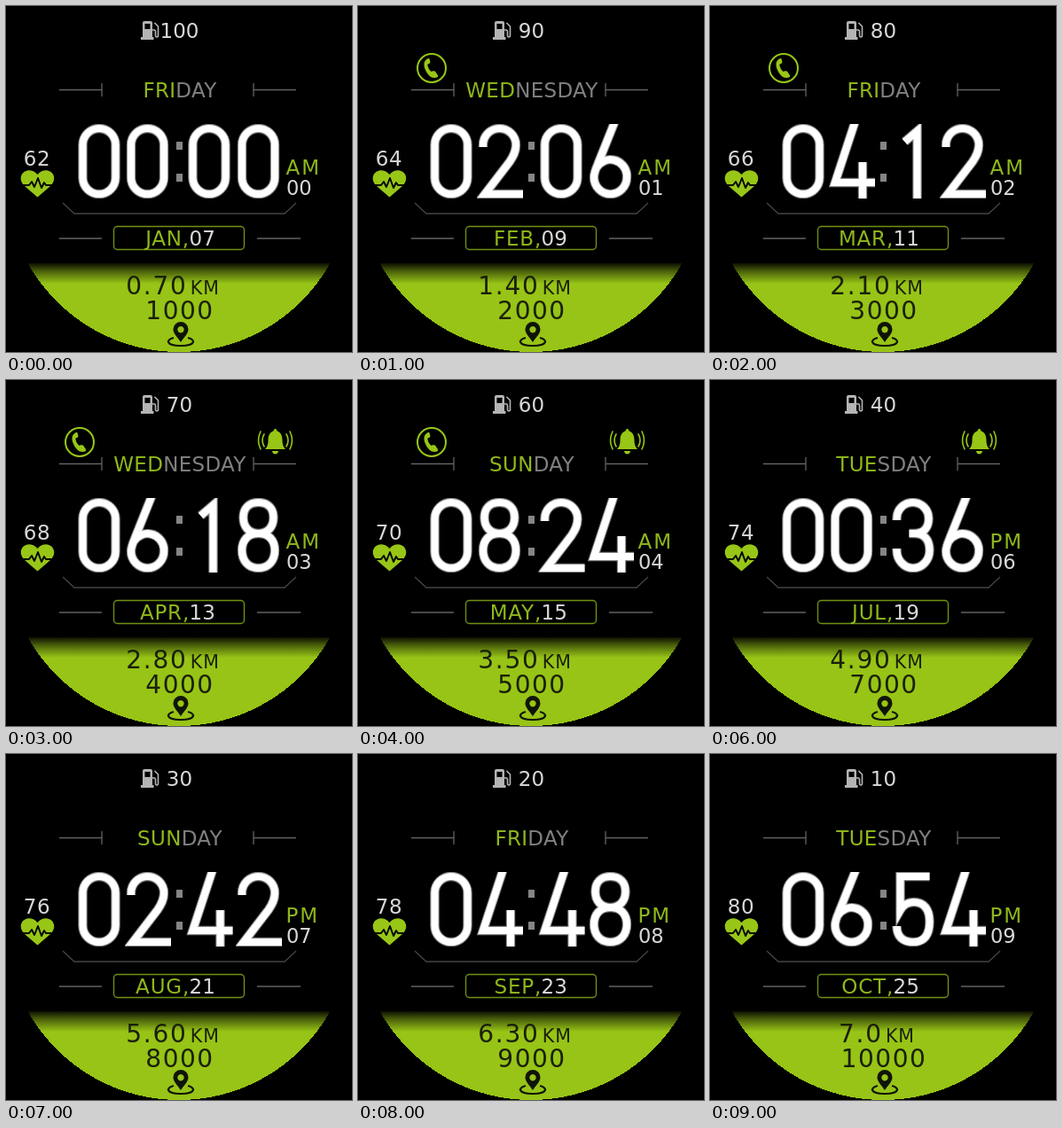
Recreate the animation shown at these times as an HTML page. Size 390 px wide and 390 px high, loop 10000 ms.

```html
<!DOCTYPE html>
<html lang="en">
<head>
<meta charset="utf-8">
<title>Watch face</title>
<style>
  html, body { margin: 0; width: 100%; height: 100%; overflow: hidden; background: #000; }
  svg { display: block; width: 100%; height: 100%; }
  text { font-family: "DejaVu Sans", sans-serif; font-size: 23px; fill: #d8d8d8; }
  .mid { text-anchor: middle; }
  .end { text-anchor: end; }
  .green { fill: #98c616; }
  text.green, tspan.green { fill: #8fb81a; }
  .gray { fill: #808080; }
  .dark { fill: #1a200a; font-size: 28px; }
  .unit { font-size: 20.5px; letter-spacing: 1px; }
  .line { fill: none; stroke: #98c616; stroke-linecap: round; stroke-linejoin: round; }
  .rule { fill: none; stroke: #626262; stroke-width: 1.3; }
  .digits path { fill: none; stroke-linejoin: miter; }
  .rim { stroke: #858585; stroke-width: 10.4; }
  .face { stroke: #fff; stroke-width: 8.2; }
</style>
</head>
<body>
<svg viewBox="0 0 390 390">
  <defs>
    <linearGradient id="shade" x2="0" y2="1">
      <stop offset="0" stop-opacity=".92"/>
      <stop offset=".4" stop-opacity=".5"/>
      <stop offset="1" stop-opacity="0"/>
    </linearGradient>
    <clipPath id="base"><rect y="290" width="390" height="100"/></clipPath>
    <clipPath id="cell"><rect x="-2" width="56" height="84"/></clipPath>
  </defs>
  <rect width="390" height="390"/>

  <g clip-path="url(#base)">
    <circle cx="195" cy="195" r="195" fill="#97c416" shape-rendering="crispEdges"/>
    <rect y="290" width="390" height="23" fill="url(#shade)"/>
  </g>

  <!-- fuel pump -->
  <g fill="#b4b4b4">
    <path fill-rule="evenodd" d="M154 19q0-2 2-2h7q2 0 2 2v16h1.500v3H152v-3h2zM156.500 20v6h6v-6z"/>
    <path d="M165 27h2q1.500 0 1.500 2v4q0 2 1.500 2t1.500-2V23l-4-4" fill="none" stroke="#b4b4b4" stroke-width="1.600"/>
  </g>
  <text id="fuel" class="mid" x="195.500" y="36"/>

  <g id="call">
    <circle class="line" cx="83" cy="70" r="16" stroke-width="2"/>
    <path class="green" transform="rotate(12 83 70)" d="M77 60c-5 3-4 9 0 14s9 8 14 5q2-1 0-3l-3-3q-1-1-3 0l-1.500 1q-4-2-6-7l2-1.500q1-1 .500-2l-1.500-3q-.500-1-1.500-.500z"/>
  </g>
  <g id="alarm">
    <path class="green" d="M303.500 55q2 0 2 2.500c5 2 6 6 6 11q0 6 3.500 9.500h-23q3.500-3.500 3.500-9.500c0-5 1-9 6-11q0-2.500 2-2.500zM300 80h7q-.500 3.500-3.500 3.500t-3.500-3.500z"/>
    <path class="line" stroke-width="1.600" d="M291 61q-4 7 0 14M287 58q-5 10 0 20M316 61q4 7 0 14M320 58q5 10 0 20"/>
  </g>

  <path class="rule" d="M60 94.500H108M108 87v15M279 94.500h48M279 87v15M60 262h48M283 262h49"/>
  <text class="mid" x="196" y="102.500" letter-spacing=".300"><tspan id="dayHead" class="green"/><tspan id="dayTail" class="gray"/></text>

  <text id="pulse" class="mid" x="35" y="180" letter-spacing=".500"/>
  <path class="green" d="M35.500 215.500L21 203C9 191 25 178 35.500 190C46 178 62 191 50 203z"/>
  <path d="M16 202h10l3-4 3 6 4-10 4 11 3-6 2 3h10" fill="none" stroke="#000" stroke-width="1.900" stroke-linejoin="round"/>

  <g id="clock" class="digits" role="img"></g>
  <path d="M192 153h7v9h-7zM192 189h7v9h-7z" fill="#858585"/>
  <text id="half" class="green" x="315.500" y="190" letter-spacing="2"/>
  <text id="seconds" x="316" y="213" style="font-size:22.500px"/>
  <path class="rule" d="M64 222l13 12H314l13-12" style="stroke:#444"/>

  <rect class="line" x="121.500" y="248.500" width="147" height="26" rx="4" stroke-width="1.400" style="stroke:#6f9014"/>
  <text id="month" class="green end" x="207" y="270" letter-spacing=".800"/>
  <text id="date" x="206.500" y="270"/>

  <text class="mid dark" x="188" y="324.500"><tspan id="distance" letter-spacing="1.800"/><tspan class="unit" dx="3">KM</tspan></text>
  <text id="steps" class="mid dark" x="196" y="353" letter-spacing="1.500"/>

  <!-- map pin -->
  <path d="M197 379c-4-6-8.500-10-8.500-14.500a8.500 8.500 0 0 1 17 0c0 4.500-4.500 8.500-8.500 14.500zM197 361a3.700 3.700 0 1 0 .010 0z" fill="#101408" fill-rule="evenodd"/>
  <path d="M189 374c-9 2-9 9 8 9s17-7 8-9" fill="none" stroke="#101408" stroke-width="2.200"/>
</svg>
<script>
const strokes = {
  0: "M5 23.500a18.500 18.500 0 0 1 37 0v37a18.500 18.500 0 0 1-37 0z",
  1: "M14 20L28 8V84",
  2: "M5 26V23.500a18.500 18.500 0 0 1 37 0c0 8-3 13-7 19L7 79H50",
  3: "M5 25v-2a18 18 0 0 1 36 0c0 11-6 17-16 17h-6h6c11 0 17 7 17 19a18.500 20 0 0 1-37 0v-2",
  4: "M28-4L5 66H50M36 43V84",
  5: "M42 5H9V43c4-7 9-9 15-9c12 0 18 8 18 22c0 15-6 23-18.500 23C12 79 5 73 5 61",
  6: "M29-4L9 46C6 53 5 56 5 60a18.500 19 0 0 0 37 0v-3a18.500 19 0 0 0-34-8",
  8: "M23.500 5c11 0 17 7 17 17s-6 18-17 18s-17-8-17-18s6-17 17-17zM23.500 40c12 0 18.500 8 18.500 19s-6.500 20-18.500 20s-18.500-9-18.500-20s6.500-19 18.500-19z"
};
const slots = [81.5, 136, 205.5, 261];
const days = ["FRI", "WED", "FRI", "WED", "SUN", "FRI", "TUE", "SUN", "FRI", "TUE"];
const tails = { FRI: "DAY", WED: "NESDAY", SUN: "DAY", TUE: "SDAY" };
const months = ["JAN", "FEB", "MAR", "APR", "MAY", "JUN", "JUL", "AUG", "SEP", "OCT"];

const byId = id => document.getElementById(id);
const pad = n => String(n).padStart(2, "0");
const write = (id, value) => { byId(id).textContent = value; };
const show = (id, on) => { byId(id).style.display = on ? "" : "none"; };

function drawDigit(digit, i) {
  const d = strokes[digit];
  return `<g transform="translate(${slots[i]} 133)" clip-path="url(#cell)">
    <path class="rim" d="${d}"/><path class="face" d="${d}"/></g>`;
}

function render(step) {
  const hour = pad(step * 2 % 12), minute = pad(step * 6);
  byId("clock").innerHTML = [...hour + minute].map(drawDigit).join("");
  byId("clock").setAttribute("aria-label", `${hour}:${minute}`);
  write("fuel", 100 - 10 * step);
  write("dayHead", days[step]);
  write("dayTail", tails[days[step]]);
  write("pulse", 62 + 2 * step);
  write("half", step < 6 ? "AM" : "PM");
  write("seconds", pad(step));
  write("month", months[step] + ",");
  write("date", pad(7 + 2 * step));
  write("distance", step === 9 ? "7.0" : (0.7 * (step + 1)).toFixed(2));
  write("steps", 1000 * (step + 1));
  show("call", step >= 1 && step <= 4);
  show("alarm", step >= 3 && step <= 6);
}

let current = 0;
function tick(now) {
  const step = Math.floor(now / 1000) % 10;
  if (step !== current) render(current = step);
  requestAnimationFrame(tick);
}
render(0);
requestAnimationFrame(tick);
</script>
</body>
</html>
```
